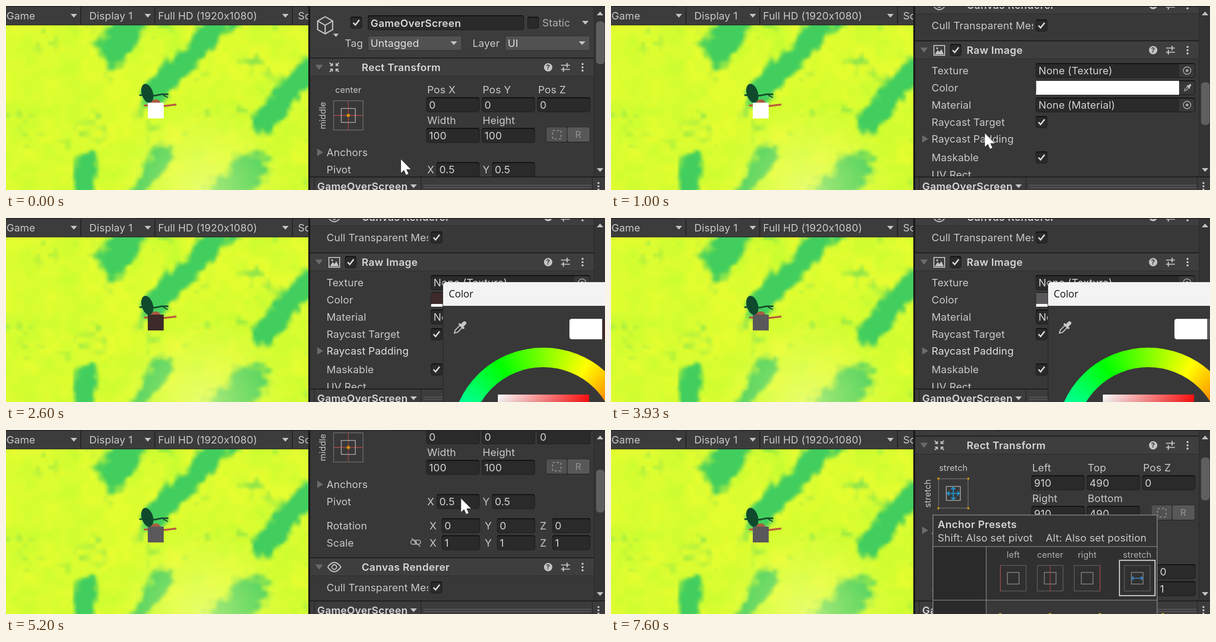
Write an HTML page with a canvas that moves like this. It is 1280 px wide and 396 px high and loops after 8 s.

```html
<!DOCTYPE html>
<html lang="en">
<head>
<meta charset="utf-8">
<title>Inspector demo</title>
<style>
html, body { margin: 0; width: 100%; height: 100%; overflow: hidden; background: #383838; }
canvas { display: block; }
</style>
</head>
<body>
<canvas id="stage" width="1280" height="396"></canvas>
<script>
const c = document.getElementById('stage').getContext('2d');
const TEXT = '#c8c8c8', ICON = '#c4c4c4', DIM = '#6b6b6b', LINE = '#1c1c1c', PANEL = '#383838', BAR = '#3c3c3c';
const STEP = 1000 / 15, NOTCH = 99;

const mix = (a, b, k) => a + (b - a) * k;
const clamp = k => Math.max(0, Math.min(1, k));
const soft = k => k * k * (3 - 2 * k);
const ramp = (n, from, to) => clamp((n - from) / (to - from));

// ---------- timeline, in steps of 1/15 s ----------
const wheelDown = [1, 3, 9, 9, 15], wheelUp = [68, 70, 70, 88];
const turns = (list, n) => list.filter(k => k <= n).length;

// pointer moves: first step, last step, place reached
const moves = [[1, 3, 799, 274], [15, 20, 930, 176], [23, 27, 933, 226], [27, 29, 1163, 444],
  [50, 57, 1300, 444], [57, 66, 1300, 165], [66, 68, 920, 170], [75, 79, 990, 140],
  [79, 87, 814, 91], [88, 92, 731, 136], [94, 100, 1100, 420]];
function pointerAt(n) {
  return moves.reduce(([x, y], [a, b, p, q]) => {
    const k = ramp(n, a, b);
    return [mix(x, p, k), mix(y, q, k)];
  }, [844, 330]);
}
function shadeAt(n) {
  const dark = Math.sqrt(ramp(n, 35, 39)), grey = ramp(n, 45, 49);
  return `rgb(${[[61, 90], [42, 88], [42, 90]].map(([d, g]) => mix(mix(255, d, dark), g, grey))})`;
}

// ---------- drawing helpers ----------
function rect(x, y, w, h, fill, r = 0) {
  c.fillStyle = fill;
  c.beginPath();
  c.roundRect(x, y, w, h, r);
  c.fill();
}
function frame(x, y, w, h, color, lw = 2, r = 0) {
  c.strokeStyle = color;
  c.lineWidth = lw;
  c.beginPath();
  c.roundRect(x, y, w, h, r);
  c.stroke();
}
function poly(points, fill) {
  c.fillStyle = fill;
  c.beginPath();
  points.forEach(p => c.lineTo(...p));
  c.fill();
}
function line(color, lw, ...points) {
  c.strokeStyle = color;
  c.lineWidth = lw;
  c.beginPath();
  points.forEach(p => c.lineTo(...p));
  c.stroke();
}
function disc(x, y, r, fill) {
  c.fillStyle = fill;
  c.beginPath();
  c.arc(x, y, r, 0, 7);
  c.fill();
}
function ring(x, y, r, color, lw = 2) {
  c.strokeStyle = color;
  c.lineWidth = lw;
  c.beginPath();
  c.arc(x, y, r, 0, 7);
  c.stroke();
}
function clipped(x, y, w, h, paint) {
  c.save();
  c.beginPath();
  c.rect(x, y, w, h);
  c.clip();
  paint();
  c.restore();
}
// y is the middle of the capitals
function text(s, x, y, color = TEXT, size = 22, weight = 400, align = 'left') {
  c.font = `${weight} ${size}px Inter, sans-serif`;
  c.letterSpacing = weight > 400 ? '.4px' : '.15px';
  c.textAlign = align;
  c.fillStyle = color;
  c.fillText(s, x, y + size * .364);
}
const bold = (s, x, y) => text(s, x, y, '#d6d6d6', 22, 600);
const small = (s, x, y, color = TEXT) => text(s, x, y, color, 18.3, 400, 'center');
const down = (x, y, w = 7, h = 4, color = ICON) => poly([[x - w, y - h], [x + w, y - h], [x, y + h]], color);
const right = (x, y) => poly([[x - 6, y - 8], [x + 7, y], [x - 6, y + 8]], DIM);

function box(x, y, w, h) {
  rect(x, y, w, h, '#202020', 5);
  rect(x + 1, y, w - 2, 6, '#0f0f0f', 5);
  rect(x + 1.5, y + 2, w - 3, h - 3.5, '#2a2a2a', 4);
}
function field(x, y, w, s) {
  box(x, y - 16, w, 32);
  if (s) text(s, x + 6, y, '#d2d2d2');
}
function dropdown(x, y, w, s) {
  rect(x, y - 16, w, 32, '#2b2b2b', 5);
  rect(x + 1, y - 15, w - 2, 30, '#515151', 4);
  text(s, x + 6, y, '#e0e0e0');
  down(x + w - 17, y);
}
function check(x, y, on = true) {
  box(x, y - 13, 25, 26);
  if (on) line('#dcdcdc', 3, [x + 6, y], [x + 10.5, y + 5], [x + 19, y - 6]);
}
function dots(x, y) {
  for (const d of [-7, 0, 7]) rect(x - 2, y + d - 2, 4, 4, ICON, 1);
}
function header(title, y) {
  rect(650, y - 20, 607, 39, '#3e3e3e');
  rect(650, y - 21, 607, 2, LINE);
  rect(650, y + 18, 607, 1.5, '#303030');
  down(669, y, 8, 5.5, DIM);
  bold(title, 760, y);
  disc(1158.5, y, 9, ICON);
  text('?', 1158.5, y, '#3e3e3e', 15, 700, 'center');
  for (const d of [-1, 1]) {
    line(ICON, 2, [1186, y + d * 4.5], [1205, y + d * 4.5]);
    line(ICON, 2.5, [1195 - d * 4, y + d * 4.5 - 5], [1195 - d * 4, y + d * 4.5 + 5]);
  }
  dots(1232, y);
}
function dropper(x, y, s) {
  c.save();
  c.translate(x, y);
  c.rotate(Math.PI / 4);
  c.scale(s, s);
  rect(-4, -18, 8, 13, TEXT, 4);
  rect(-8, -7, 16, 4.5, TEXT, 2);
  line(TEXT, 2.2, [-3.5, -3], [-3.5, 11], [0, 17], [3.5, 11], [3.5, -3]);
  c.restore();
}
function arrow(x, y, r, color, turn = 0) {
  c.save();
  c.translate(x, y);
  c.rotate(turn);
  line(color, 2, [-r, 0], [r, 0]);
  for (const d of [-r, r]) line(color, 2, [d * .65, -r * .35], [d, 0], [d * .65, r * .35]);
  c.restore();
}

// ---------- game view ----------
const hash = (x, y) => { const s = Math.sin(x * 127.1 + y * 311.7) * 43758.5; return s - Math.floor(s); };
function noise(x, y) {
  const i = Math.floor(x), j = Math.floor(y), u = soft(x - i), v = soft(y - j);
  return mix(mix(hash(i, j), hash(i + 1, j), u), mix(hash(i, j + 1), hash(i + 1, j + 1), u), v);
}
// green strips: from, to, radius
const strips = [[455, 35, 312, 188, 38], [650, 125, 550, 250, 38], [335, 315, 280, 396, 34],
  [520, 345, 470, 400, 60], [255, 55, 225, 95, 48], [170, 335, 165, 385, 34]];
function closeness(x, y, [a, b, p, q, r]) {
  const dx = p - a, dy = q - b;
  const k = clamp(((x - a) * dx + (y - b) * dy) / (dx * dx + dy * dy));
  return 1 - Math.hypot(x - a - k * dx, y - b - k * dy) / r;
}
function makeGround() {
  const cv = document.createElement('canvas'), w = cv.width = 108, h = cv.height = 60;
  const g = cv.getContext('2d');
  for (let j = 0; j < h; j++) for (let i = 0; i < w; i++) {
    const x = i * 6, y = 41 + j * 6;
    const n = noise(x / 38, y / 38) * .55 + noise(x / 13, y / 13) * .45 - .5;
    const green = Math.max(0, ...strips.map(s => closeness(x, y, s))) * 1.1;
    const k = soft(clamp((green + n * .9 - .14) / .55));
    const m = noise(x / 45 + 9, y / 45) * .6 + noise(x / 15, y / 15 + 5) * .4;
    g.fillStyle = `rgb(${mix(mix(198, 236, m), 66, k)},${mix(253, 206, k)},${mix(48, 94, k)})`;
    g.fillRect(i, j, 1, 1);
  }
  return cv;
}
const ground = makeGround();

function bug() {
  line('#164d2c', 3.5, [285, 192], [302, 191], [318, 193], [332, 190], [347, 190]);
  line('#164d2c', 2.5, [336, 192], [346, 197]);
  c.fillStyle = '#0f4a2d';
  c.beginPath();
  c.ellipse(302, 188, 12, 21, -.3, 0, 7);
  c.fill();
  line('#b8593d', 4, [295, 214], [340, 215], [364, 212]);
  disc(320, 212, 11, '#a95c40');
}
function game(color) {
  clipped(0, 41, 646, 355, () => {
    c.imageSmoothingQuality = 'high';
    c.drawImage(ground, 0, 41, 648, 360);
    const glow = c.createRadialGradient(420, 400, 0, 420, 400, 190);
    glow.addColorStop(0, 'rgba(245,255,150,.6)');
    glow.addColorStop(1, 'rgba(245,255,110,0)');
    rect(200, 200, 446, 196, glow);
    bug();
  });
  rect(303, 208, 34, 34, color);

  rect(0, 0, 646, 41, BAR);
  rect(0, 0, 646, 2, '#242424');
  rect(141, 0, 133, 1, BAR);
  rect(0, 40, 646, 1.5, '#232323');
  for (const x of [159, 317, 611]) {
    rect(x, 2, 2, 39, '#232323');
    if (x < 600) down(x - 14, 21);
  }
  down(597, 21);
  text('Game', 1, 21);
  text('Display 1', 178, 21);
  text('Full HD (1920x1080)', 325, 21);
  text('Sc', 624, 21);
  rect(646, 0, 4, 396, '#191919');
}

// ---------- inspector ----------
function cube(x, y, r) {
  const corner = i => [x + r * Math.sin(i * Math.PI / 3), y - r * Math.cos(i * Math.PI / 3)];
  line(TEXT, 2.5, ...[0, 1, 2, 3, 4, 5, 6].map(corner));
  for (const i of [1, 3, 5]) line(TEXT, 2.5, [x, y], corner(i));
}
function objectHeader() {
  rect(650, 0, 607, 111, BAR);
  cube(682, 41.5, 18.5);
  down(705, 63, 6, 3.5);
  check(736, 36);
  field(773, 36, 334);
  bold('GameOverScreen', 779, 37);
  check(1114, 36, false);
  text('Static', 1146, 36, '#b0b0b0');
  down(1238, 36);
  text('Tag', 724, 80);
  dropdown(773, 80, 201, 'Untagged');
  text('Layer', 997, 80);
  dropdown(1066, 80, 182, 'UI');
}
function anchorBox(stretched) {
  const x = 731.5, y = 235.5;
  small(stretched ? 'stretch' : 'center', x, 180);
  c.save();
  c.translate(676, y);
  c.rotate(-Math.PI / 2);
  small(stretched ? 'stretch' : 'middle', 0, 0);
  c.restore();
  frame(x - 31.5, y - 31.5, 63, 63, '#707070', 1.5);
  if (!stretched) {
    line('#a84444', 1.8, [x - 31, y], [x + 31, y]);
    line('#a84444', 1.5, [x, y - 31], [x, y + 31]);
  }
  frame(x - 15, y - 15, 30, 30, '#b0b0b0', 1.6);
  if (stretched) {
    for (const turn of [0, Math.PI / 2]) arrow(x, y, 13, '#1b9fe0', turn);
    for (const a of [-32, 32]) for (const b of [-32, 32]) rect(x + a - 2, y + b - 2, 4, 4, '#d99a00');
  } else rect(x - 3, y - 3, 6, 6, '#d99a00');
}
function rectTransform(stretched) {
  header('Rect Transform', 132);
  for (const a of [-1, 1]) for (const b of [-1, 1]) {
    const at = (x, y) => [701.5 + a * x, 132 + b * y];
    line(ICON, 2.3, at(4, 9), at(4, 4), at(9, 4));
    line(ICON, 2.3, at(4, 4), at(10, 10));
  }
  anchorBox(stretched);
  const labels = stretched ? ['Left', 'Top', 'Right', 'Bottom'] : ['Pos X', 'Pos Y', 'Width', 'Height'];
  const values = stretched ? ['910', '490'] : ['0', '0', '100', '100'];
  labels.forEach((s, i) => {
    const x = 898 + i % 2 * 118.5, y = 180 + (i >> 1) * 66;
    text(s, x + 2, y);
    field(x, y + 32.5, 114, values[i % values.length]);
  });
  text('Pos Z', 1137, 180);
  field(1135, 212.5, 114, '0');
  rect(1154, 260, 94, 34, '#2b2b2b', 4);
  rect(1155, 261, 43.5, 31, '#515151', 3);
  rect(1200, 261, 47, 31, '#585858', 3);
  c.setLineDash([5, 4]);
  frame(1168, 268, 18, 18, '#8c8c8c', 2);
  c.setLineDash([]);
  text('R', 1223, 277, '#8a8a8a', 20, 500, 'center');
  right(671, 315);
  text('Anchors', 685, 315);
  text('Pivot', 685, 352);
  ['X', 'Y'].forEach((axis, i) => {
    text(axis, 900 + i * 118.5, 352);
    field(920 + i * 118.5, 352, 92, '0.5');
  });
  ['Rotation', 'Scale'].forEach((s, row) => {
    const y = 404 + row * 36.5;
    text(s, 685, y);
    ['X', 'Y', 'Z'].forEach((axis, i) => {
      text(axis, 905 + i * 118, y);
      field(931 + i * 118, y, 82, String(row));
    });
  });
  for (const x of [865, 874]) frame(x, 435, 12, 9, '#a8a8a8', 2, 5);
  line('#a8a8a8', 2, [867, 431], [885, 449]);
}
function eye(x, y) {
  c.strokeStyle = ICON;
  c.lineWidth = 2.3;
  c.beginPath();
  c.moveTo(x - 14, y);
  c.quadraticCurveTo(x, y - 20, x + 14, y);
  c.quadraticCurveTo(x, y + 20, x - 14, y);
  c.stroke();
  ring(x, y, 5, ICON, 2.3);
}
function components(s) {
  header('Canvas Renderer', 493);
  eye(701.5, 493);
  clipped(680, 520, 222, 40, () => text('Cull Transparent Mesh', 685, 537));

  header('Raw Image', 590);
  frame(690, 580, 23, 21, ICON, 2);
  poly([[692, 599], [698, 590], [702, 594], [706, 588], [711, 599]], ICON);
  disc(697, 586, 2, ICON);
  check(724, 590);
  ['Texture', 'Material'].forEach((name, i) => {
    const y = 634 + i * 74;
    text(name, 685, y);
    field(907.5, y, 341, `None (${name})`);
    rect(1214, y - 14, 33, 28, PANEL, 3);
    ring(1231, y, 8, '#a8a8a8', 1.8);
    disc(1231, y, 3, '#a8a8a8');
  });
  text('Color', 685, 671, s.focused ? '#7fb0f5' : TEXT);
  field(907.5, 671, 341);
  rect(1214, 657, 33, 28, PANEL, 3);
  rect(908.5, 656, 305.5, 30, s.color);
  rect(908.5, 680, 305.5, 6, '#fff');
  dropper(1232, 671, .56);
  if (s.focused) frame(908, 655, 340, 32, '#3a79bb', 2, 4);
  right(671, 781);
  text('Raycast Target', 685, 745);
  text('Raycast Padding', 685, 781, s.picking ? '#dedede' : TEXT);
  text('Maskable', 685, 821);
  text('UV Rect', 685, 858);
  for (const y of [537, 745, 821]) check(907.5, y);
}
function inspector(s) {
  rect(650, 0, 630, 396, PANEL);
  clipped(650, 2, 607, 365, () => {
    c.translate(0, -s.scroll);
    objectHeader();
    rectTransform(s.stretched);
    components(s);
  });
  rect(650, 0, 630, 2, '#242424');
  rect(650, 0, 171, 1, BAR);

  rect(1256, 2, 24, 365, '#343434');
  rect(1256, 2, 1.5, 365, '#2b2b2b');
  rect(1261, 33 + s.scroll * .265, 18, 92, '#5f5f5f', 7);
  down(1269.5, 16, 7, -4);
  down(1269.5, 353);
  rect(650, 367, 630, 29, BAR);
  rect(650, 367, 630, 2, LINE);
  for (const x of [658, 886, 1252]) rect(x, 369, 1.5, 27, '#262626');
  bold('GameOverScreen', 665, 388);
  down(871, 388);
  for (const y of [385, 390]) rect(893, y, 359, 1.5, '#606060');
  dots(1266, 388);
}

// ---------- overlays ----------
function picker(color) {
  rect(933, 138, 347, 258, '#2c2c2c');
  rect(935, 189, 345, 207, PANEL);
  rect(934, 138, 360, 51, '#f3f3f3', [6, 0, 0, 0]);
  c.font = '21px "Open Sans", sans-serif';
  c.letterSpacing = '0px';
  c.textAlign = 'left';
  c.fillStyle = '#111';
  c.fillText('Color', 946, 171);
  dropper(970, 236, .98);
  rect(1204, 217, 70, 44, '#fff', [5, 0, 0, 5]);
  rect(1274, 217, 6, 44, color);
  const hues = c.createConicGradient(0, 1148, 476);
  for (let i = 0; i <= 24; i++) hues.addColorStop(i / 24, `hsl(${360 - i * 15} 100% 50%)`);
  ring(1148, 476, 176, hues, 42);
  const across = c.createLinearGradient(1051, 0, 1246, 0);
  across.addColorStop(0, '#fff');
  across.addColorStop(1, '#ff1010');
  const shade = c.createLinearGradient(0, 380, 0, 575);
  shade.addColorStop(0, 'rgba(0,0,0,0)');
  shade.addColorStop(1, '#000');
  for (const fill of [across, shade]) rect(1051, 380, 195, 195, fill);
}
function presets(stretched) {
  rect(687, 182, 481, 220, '#777');
  rect(689, 184, 477, 216, '#343434');
  rect(689, 251, 477, 149, '#303030');
  rect(689, 251, 112, 149, '#2a2a2a');
  rect(802, 367, 364, 33, PANEL);
  for (const y of [250, 365.5]) rect(689, y, 477, 1.5, '#808080');
  rect(801, 251, 1.5, 145, '#808080');
  bold('Anchor Presets', 698, 203);
  text('Shift: Also set pivot', 698, 232);
  text('Alt: Also set position', 929, 232);
  ['left', 'center', 'right', 'stretch'].forEach((s, i) => {
    const x = i < 3 ? 859.5 + i * 79 : 1124.5;
    small(s, x, 268.5, '#b0b0b0');
    frame(x - 27.5, 291.5, 55, 55, '#5e5e5e', 1.5);
    frame(x - 12.5, 306.5, 25, 25, '#8c8c8c', 1.5);
    const edge = x + (i - 1) * 27.5;
    if (i < 3) line('#a84040', 1.4, [edge, 291], [edge, 347]);
    else arrow(x, 319, 12, '#3b82c4');
    if (i === (stretched ? 3 : 1)) frame(x - 38, 280.5, 76, 76, '#e6e6e6', 2);
    rect(edge - 3, 394, 5, 2, '#c79a2a');
  });
}
function pointer([x, y]) {
  const shape = [[0, 0], [0, 29], [6.5, 23], [11, 33.5], [16, 31], [11.5, 21.5], [21, 21.5]]
    .map(([a, b]) => [a + x, b + y]);
  line('#222', 1.5, ...shape, shape[0]);
  poly(shape, '#fff');
}

function draw(now) {
  const n = Math.floor((now % 8000 + 4) / STEP) % 120;
  const s = {
    scroll: NOTCH * (turns(wheelDown, n) - turns(wheelUp, n)),
    color: shadeAt(n),
    picking: n >= 23 && n < 66,
    focused: n >= 66,
    stretched: n >= 113
  };
  game(s.color);
  inspector(s);
  if (s.picking) picker(s.color);
  if (n >= 94) presets(s.stretched);
  pointer(pointerAt(n));
}
const start = performance.now();
function tick() {
  draw(performance.now() - start);
  requestAnimationFrame(tick);
}
tick();
</script>
</body>
</html>
```
